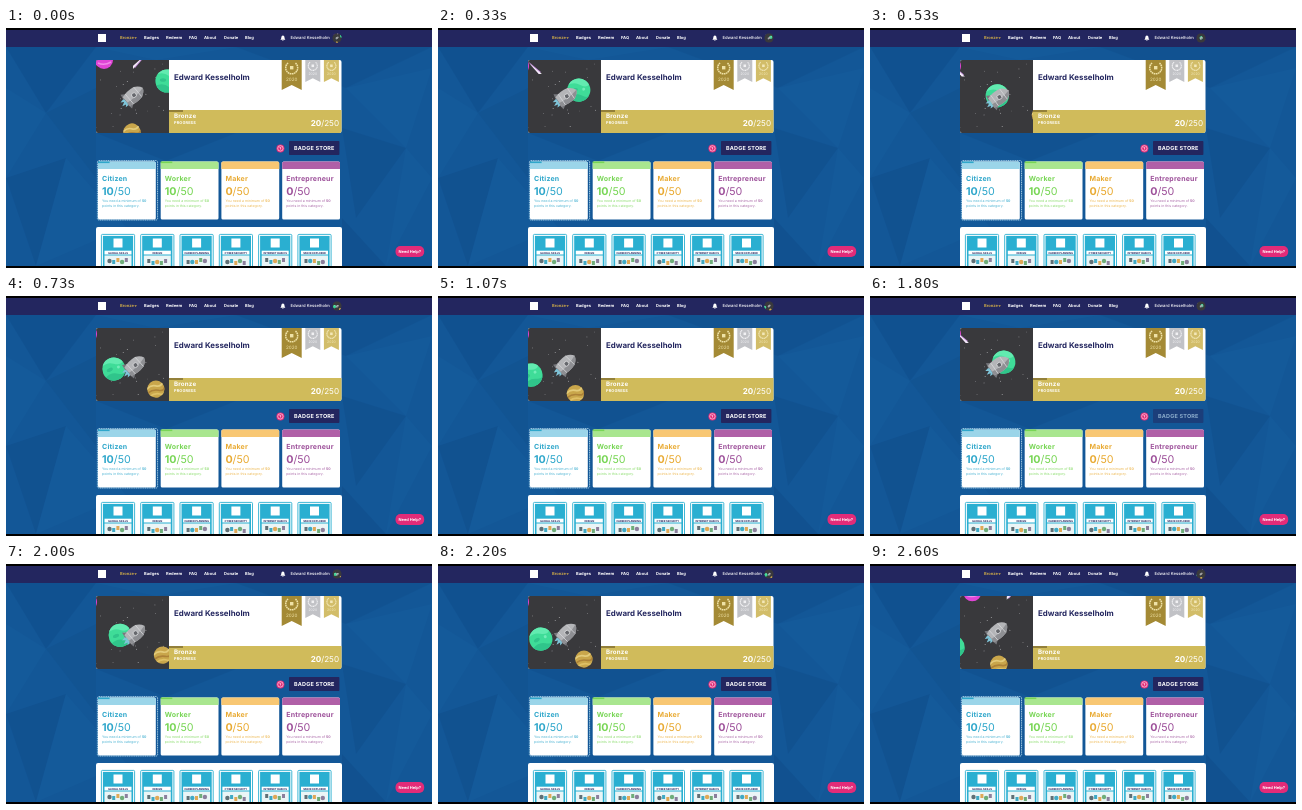
Animation of 426x240 px, one loop 2670 ms. Source, as an HTML page:

```html
<!DOCTYPE html>
<html lang="en">
<head>
<meta charset="utf-8">
<title>Learner dashboard</title>
<style>
  html, body { margin: 0; width: 100%; height: 100%; overflow: hidden; background: #000; }
  svg { display: block; width: 100%; height: 100%; }
  text { font-family: Inter, "Open Sans", sans-serif; text-rendering: geometricPrecision; }
  .b { font-weight: 700; }
  .m { text-anchor: middle; }
  .w { fill: #fff; }
  .nav { font-size: 4.1px; font-weight: 700; fill: #fff; }
  .wide { letter-spacing: .03em; }
</style>
</head>
<body>
<svg viewBox="0 0 426 240">
  <defs>
    <clipPath id="cardClip"><rect x="90" y="32" width="245.5" height="73" rx="2"/></clipPath>
    <clipPath id="skyClip"><rect x="90" y="32" width="73" height="73"/></clipPath>
    <clipPath id="faceClip"><circle cx="126.5" cy="68.5" r="36"/></clipPath>
    <clipPath id="page"><rect y="2" width="426" height="236"/></clipPath>
    <clipPath id="disc"><circle r="11.6"/></clipPath>
    <clipPath id="goldDisc"><circle r="8.6"/></clipPath>
  </defs>

  <rect width="426" height="240"/>
  <g clip-path="url(#page)">
    <rect width="426" height="240" fill="#135797"/>
    <g id="facets" opacity=".4"></g>

    <rect width="426" height="19" fill="#23265f"/>
    <rect class="w" x="92" y="6" width="8" height="8"/>
    <g id="nav"></g>
    <path d="M128.3 9.2h2.6l-1.3 1.7z" fill="#c8a64a"/>
    <path class="w" d="M274.4 11.7Q275.3 11 275.3 9.5Q275.4 7.7 276.9 7.5Q278.5 7.7 278.5 9.5Q278.5 11 279.4 11.7ZM276.1 12.1h1.6q-.8 1.1-1.6 0z"/>

    <g clip-path="url(#cardClip)">
      <rect class="w" x="90" y="32" width="246" height="73"/>
      <g id="scene" clip-path="url(#skyClip)">
        <rect x="90" y="32" width="73" height="73" fill="#39393c"/>
        <g id="stars" fill="#d9d9dc"></g>
        <g id="pink">
          <circle r="9" fill="#e045d6"/>
          <path d="M-6 3Q0 6 7 2" fill="none" stroke="#f08ae8" stroke-width="1.5"/>
        </g>
        <g id="comet">
          <path d="M-7-7L6 4L4 6Z" fill="#c88fe0"/>
          <path d="M-6-5L7 6L4 6Z" fill="#f4eef8"/>
        </g>
        <g id="gold">
          <circle r="8.6" fill="#c9a64b"/>
          <g clip-path="url(#goldDisc)" fill="none" stroke-width="1.7">
            <path d="M-9-3Q-3-6 1-3T9-4" stroke="#e3cb7a"/>
            <path d="M-9 1Q-3-1 2 2T9 1" stroke="#ad8238"/>
            <path d="M-9 5Q-2 3 2 6T9 4" stroke="#dfc066"/>
          </g>
        </g>
        <g id="green">
          <circle r="11.6" fill="#3fdc98"/>
          <g clip-path="url(#disc)">
            <path d="M-12-6Q-4-10 2-5T12-4V-12H-12Z" fill="#62ebb0"/>
            <path d="M-12 5Q-4 1 2 6T12 5V12H-12Z" fill="#30c58b"/>
            <ellipse cx="-4" cy="-1" rx="3.2" ry="1.8" fill="#30c58b"/>
            <circle cx="5" r="1.5" fill="#72edb9"/>
          </g>
        </g>
        <g id="rocket">
          <path d="M-9-4L-14-3L-11-1L-15 1L-11 2L-13 4L-9 4Z" fill="#7fc4d8"/>
          <path d="M-3-5L-9-9L-10-3ZM-3 5L-9 9L-10 3Z" fill="#77787d"/>
          <path d="M-9-5.5Q-2-8 6-6.5Q11-4 12.5 0Q11 4 6 6.5Q-2 8-9 5.5Z" fill="#b4b5b8"/>
          <path d="M-9 1.5Q2 3 12.5 0Q11 4 6 6.5Q-2 8-9 5.5Z" fill="#8e8f93"/>
          <path d="M-5-6.5V6.5M6-6V6" stroke="#d4d5d8" stroke-width=".8"/>
          <circle cx="1" r="2.4" fill="#66686d" stroke="#dedfe1" stroke-width=".8"/>
        </g>
      </g>
      <rect x="163" y="82" width="173" height="23" fill="#d0bb5b"/>
      <rect x="163" y="82" width="14" height="2" fill="#93803a"/>
      <g id="ribbons"></g>
    </g>
    <text class="b" x="168" y="52" font-size="7.9" fill="#23265f">Edward Kesselholm</text>
    <text class="b w wide" x="168" y="90" font-size="6.2">Bronze</text>
    <text class="b w wide" x="168" y="95.6" font-size="3.9">PROGRESS</text>
    <text class="w" x="333" y="98" font-size="8.1" text-anchor="end"><tspan class="b">20</tspan>/250</text>

    <circle cx="274.4" cy="120.4" r="4" fill="#e32b78"/>
    <circle cx="274.4" cy="120.4" r="2.7" fill="none" stroke="#fff" stroke-width=".6"/>
    <text class="b w m" x="274.4" y="121.8" font-size="3.8">?</text>
    <g id="store">
      <rect x="283" y="113" width="50.4" height="14" rx=".8" fill="#23265f"/>
      <text class="b w m wide" x="308.3" y="122" font-size="5.5">BADGE STORE</text>
    </g>

    <g id="cards"></g>
    <rect x="91.4" y="132.6" width="60.2" height="59.4" rx="1.5" fill="none" stroke="#c9ecfa" stroke-width=".8" stroke-dasharray="1.2 .6"/>

    <rect class="w" x="90" y="199" width="246" height="42" rx="2"/>
    <g id="badges"></g>

    <rect x="389.5" y="218" width="28.7" height="11" rx="5" fill="#e32b78"/>
    <text class="b w m" x="403.8" y="225" font-size="4">Need Help?</text>
  </g>
</svg>
<script>
const $ = id => document.getElementById(id);
const fill = (id, list, draw) => { $(id).innerHTML = list.map(draw).join(''); };

fill('facets', [
  ['0,19 90,19 40,85', '#0e4a87'], ['0,60 40,85 0,150', '#175f9f'],
  ['40,85 90,60 90,150', '#11508c'], ['0,150 60,130 30,238', '#104b88'],
  ['60,130 120,199 30,238', '#175f9f'], ['90,19 230,19 150,32', '#175f9f'],
  ['230,19 426,19 340,60', '#104d8a'], ['340,60 426,40 400,120', '#175f9f'],
  ['336,100 400,120 350,190', '#104b88'], ['400,120 426,150 380,238', '#175f9f'],
  ['336,190 380,238 336,238', '#0f4a86'], ['90,105 230,105 160,133', '#104d8a']
], ([points, c]) => `<polygon points="${points}" fill="${c}"/>`);

fill('nav', [
  ['Bronze', 114, '#c8a64a'], ['Badges', 138], ['Redeem', 160], ['FAQ', 183],
  ['About', 198], ['Donate', 218], ['Blog', 239]
], ([s, x, c = '#fff']) => `<text class="nav" x="${x}" y="11.4" style="fill:${c}">${s}</text>`);
$('nav').innerHTML += `<text class="w" x="284.5" y="11.4" font-size="4.2" font-weight="500">Edward Kesselholm</text>
  <use href="#scene" clip-path="url(#faceClip)" transform="translate(331 10) scale(.13) translate(-126.5 -68.5)"/>`;

let seed = 7;
const rand = () => (seed = seed * 16807 % 2147483647) / 2147483647;
fill('stars', Array(24).fill(0), () =>
  `<circle cx="${90 + rand() * 73}" cy="${32 + rand() * 73}" r="${.2 + rand() * .3}"/>`);

fill('ribbons', [
  [285.7, 20, 30, '#a48a35', '#efe2a6'], [306.8, 15, 22, '#c1c2c6', '#f1f1f3'], [325.4, 15, 22, '#d2bd69', '#f3e8b8']
], ([x, w, h, c, light]) => {
  const k = w / 20;
  return `<g transform="translate(${x} 32)">
    <path d="M${-w / 2} 0H${w / 2}V${h}L0 ${h - 5 * k}L${-w / 2} ${h}Z" fill="${c}"/>
    <g transform="scale(${k})">
      <path d="M-3.6 3A6 6 0 1 0 3.6 3" fill="none" stroke="${light}" stroke-width="1.5" stroke-dasharray="1.6 .5"/>
      <rect x="-1.7" y="6" width="3.4" height="3.4" fill="${light}"/>
      <text class="m" y="20.5" font-size="4.6" fill="${light}">2020</text>
    </g></g>`;
});

fill('cards', [
  ['Citizen', 92, 10, '#9bd5e9', '#2fa7cb'],
  ['Worker', 154.7, 10, '#a9e68f', '#78d655'],
  ['Maker', 215.4, 0, '#f8c773', '#e9ab34'],
  ['Entrepreneur', 276.2, 0, '#b060a7', '#9d509a']
], ([name, x, n, band, ink]) => `<g transform="translate(${x} 133.5)" fill="${ink}">
    <rect class="w" width="57.8" height="58" rx="1.6"/>
    <path d="M0 7.5V1.6Q0 0 1.6 0H56.2Q57.8 0 57.8 1.6V7.5Z" fill="${band}"/>
    <rect width="${n * 1.16}" height="1.6"/>
    <text class="b wide" x="4" y="19.4" font-size="7">${name}</text>
    <text x="4" y="33.2" font-size="10.7"><tspan class="b">${n}</tspan>/50</text>
    <g font-size="3.5" opacity=".85">
      <text x="4" y="40.8">You need a minimum of <tspan class="b">50</tspan></text>
      <text x="4" y="45.4">points in this category.</text>
    </g></g>`);

const bits = ['#5f6f75', '#3fa9c4', '#e0a856', '#6fae7a', '#8b7f9c'];
fill('badges', ['GLOBAL SKILLS', 'DESIGN', 'CAREER PLANNING', 'CYBER SECURITY', 'INTERNET BASICS', 'SPACE EXPLORER'],
  (label, i) => `<g transform="translate(${95 + i * 39.3} 206)">
    <rect x=".4" y=".4" width="33.2" height="40" rx="1" fill="#fff" stroke="#2aafd1" stroke-width=".9"/>
    <rect x="1.9" y="1.9" width="30.2" height="38" fill="#2aafd1"/>
    <rect class="w" x="12.5" y="4.5" width="9" height="9"/>
    <rect class="w" x="3.5" y="16.7" width="27" height="3.8"/>
    <text class="b m" x="17" y="19.6" font-size="2.6" fill="#23265f">${label}</text>
    <rect x="3.5" y="21.5" width="27" height="12" fill="#eaf5f6"/>
    ${bits.map((c, k) => (i + k) % 3
      ? `<rect x="${7 + k * 4.2}" y="${24 + (i + k * 2) % 4}" width="3" height="4" fill="${c}"/>`
      : `<circle cx="${8.5 + k * 4.2}" cy="${27 + (i + k) % 2}" r="2.2" fill="${c}"/>`).join('')}
  </g>`);

// Paths: [ms, x, y], one pass per orbit
const ORBIT = 1335, LOOP = 2670, FRAMES = 40;
const paths = {
  green: [[-65, 176, 42], [0, 161, 53], [65, 156, 56], [330, 141, 62], [465, 134, 66],
    [730, 108, 73], [865, 103, 75], [1270, 83, 83]],
  gold: [[500, 174, 86], [730, 150, 93], [865, 146, 95], [1265, 129, 100], [1335, 126, 104], [1400, 110, 105], [1560, 84, 114]],
  comet: [[-130, 152, 24], [0, 133, 34], [65, 121, 37], [330, 97, 40], [465, 92, 41], [700, 78, 46]],
  pink: [[-250, 114, 18], [0, 98, 32], [65, 96, 33], [330, 82, 38]]
};

function at(path, t) {
  const start = path[0][0];
  t = start + ((t - start) % ORBIT + ORBIT) % ORBIT;
  let i = 1;
  while (i < path.length - 1 && path[i][0] < t) i++;
  const [a, b] = [path[i - 1], path[i]];
  const k = Math.min(1, (t - a[0]) / (b[0] - a[0]));
  return [a[1] + (b[1] - a[1]) * k, a[2] + (b[2] - a[2]) * k];
}
const move = (id, [x, y], turn = 0) =>
  $(id).setAttribute('transform', `translate(${x} ${y}) rotate(${turn})`);

function draw() {
  const step = Math.floor((performance.now() % LOOP + 5) / 66.7) % FRAMES;
  const t = step * LOOP / FRAMES, p = t % ORBIT;
  const a = p / ORBIT * 2 * Math.PI;
  const turn = { green: -p / 30, gold: -20, comet: p > 1000 ? 90 : Math.max(0, 90 - p / 3.6), pink: 0 };
  for (const id in paths) move(id, at(paths[id], p), turn[id]);
  move('rocket', [128 - .8 * Math.cos(a), 68.8 - Math.cos(a)], -40 + 6 * Math.sin(a));
  const dip = Math.max(0, 1 - Math.abs(t - 1800) / 200);
  $('store').setAttribute('opacity', 1 - .5 * dip);
  requestAnimationFrame(draw);
}
draw();
</script>
</body>
</html>
```
